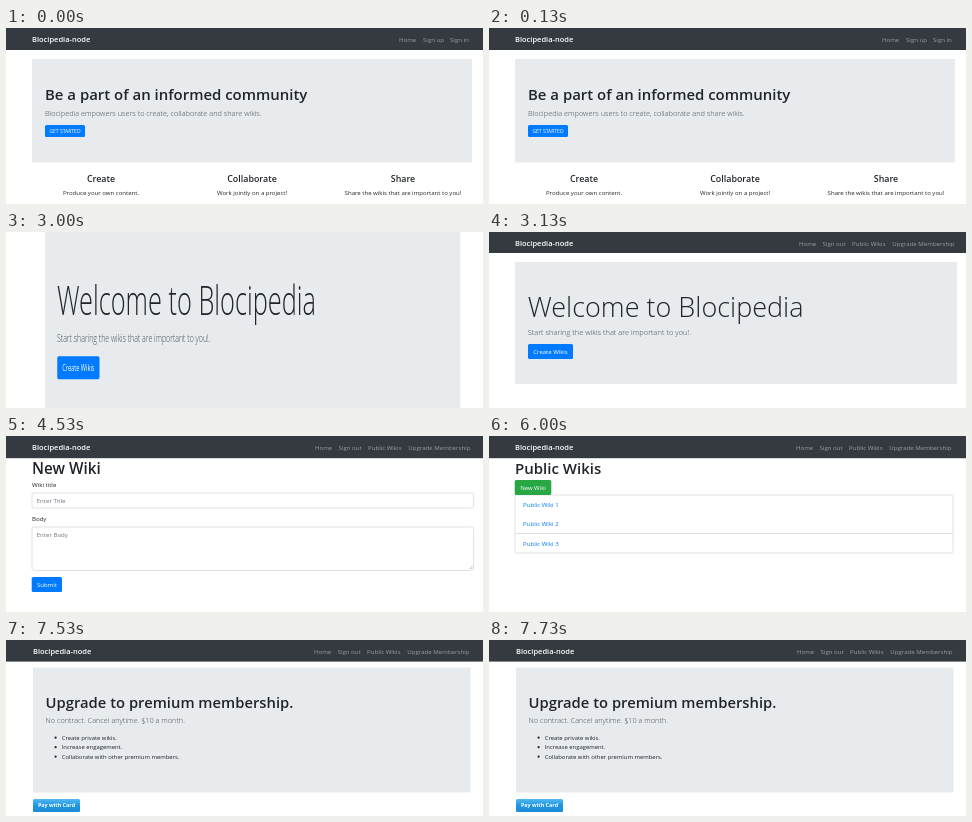
An HTML page for the animation above (8 s loop, 477x176 px).

```html
<!DOCTYPE html>
<html lang="en">
<head>
<meta charset="utf-8">
<title>Wiki tour</title>
<style>
  html, body { margin: 0; width: 100%; height: 100%; overflow: hidden; background: #fff; }
  svg { display: block; width: 100vw; height: 100vh; }
  text { font-family: "Open Sans", "Noto Sans", sans-serif; white-space: pre; }
  .scene { visibility: hidden; }
</style>
</head>
<body>
<svg id="stage" viewBox="0 0 477 176" preserveAspectRatio="none">
  <defs>
    <linearGradient id="pay" x2="0" y2="1">
      <stop offset="0" stop-color="#52b9ee"/>
      <stop offset=".5" stop-color="#1e97e3"/>
      <stop offset="1" stop-color="#1b8ad6"/>
    </linearGradient>
  </defs>
</svg>
<script>
const LOOP = 8000;
const INK = '#212529', MUTED = '#6c757d', BLUE = '#007bff', DARK = '#343a40', PANEL = '#e7ebee';
const stage = document.getElementById('stage');

function add(parent, tag, attrs, content = '') {
  const el = document.createElementNS('http://www.w3.org/2000/svg', tag);
  for (const key in attrs) el.setAttribute(key, attrs[key]);
  el.textContent = content;
  return parent.appendChild(el);
}

const text = (g, x, y, size, str, fill = INK, weight = 400, anchor = 'start') =>
  add(g, 'text', { x, y, fill, 'font-size': size, 'font-weight': weight, 'text-anchor': anchor }, str);

const box = (g, x, y, right, bottom, fill, more = {}) =>
  add(g, 'rect', { x, y, width: right - x, height: bottom - y, fill, ...more });

const outline = (g, x, y, right, bottom) =>
  box(g, x, y, right, bottom, '#fff', { rx: 1.8, stroke: '#d5dade', 'stroke-width': .8 });

const heading = (g, x, y, size, str, anchor) => text(g, x, y, size, str, INK, 600, anchor);
const lead = (g, x, y, size, str) => text(g, x, y, size, str, '#454a4f', 300);

function button(g, x, y, right, bottom, str, size = 6, fill = BLUE, weight = 500) {
  box(g, x, y, right, bottom, fill, { rx: 1.5 });
  text(g, (x + right) / 2, (y + bottom) / 2 + size * .36, size, str, '#fff', weight, 'middle');
}

function navbar(g, brandX, links, height = 22) {
  const baseline = height / 2 + 3;
  box(g, 0, 0, 477, height, DARK);
  text(g, brandX, baseline, 7.5, 'Blocipedia-node', '#fff', 600);
  for (const [x, label] of links) text(g, x, baseline, 6.1, label, '#999da0');
}

const memberLinks = x => [
  [x, 'Home'], [x + 23.5, 'Sign out'], [x + 53, 'Public Wikis'], [x + 93.3, 'Upgrade Membership']
];

function home(g) {
  navbar(g, 26, [[393, 'Home'], [417, 'Sign up'], [444, 'Sign in']]);
  box(g, 26, 31, 466, 134.5, PANEL, { rx: 1 });
  heading(g, 39, 72.3, 14.95, 'Be a part of an informed community');
  lead(g, 39, 87.7, 7.37, 'Blocipedia empowers users to create, collaborate and share wikis.');
  button(g, 39, 97, 79, 109, 'GET STARTED', 5);
  const columns = [
    [95, 'Create', 'Produce your own content.'],
    [246, 'Collaborate', 'Work jointly on a project!'],
    [397, 'Share', 'Share the wikis that are important to you!']
  ];
  for (const [x, title, note] of columns) {
    heading(g, x, 153.8, 8.9, title, 'middle');
    text(g, x, 167, 6.05, note, INK, 400, 'middle');
  }
}

function signIn(g) {
  box(g, 0, 0, 477, 6, DARK);
  text(g, 45, -1, 6.6, 'Blocipedia-node', '#fff', 500);
  heading(g, 45, 19.6, 13.5, 'Sign in');
  const fields = [
    ['Username', 'Enter Username', 'username'],
    ['Email', 'Enter email address', 'address'],
    ['Password', 'Enter password', 'password']
  ];
  fields.forEach(([label, hint, kind], i) => {
    const y = i * 38.3;
    text(g, 45, 31.2 + y, 5.2, label);
    outline(g, 44.8, 36.6 + y, 432, 49.6 + y);
    text(g, 49.7, 45 + y, 5.4, hint, MUTED);
    text(g, 45, 55.4 + y, 4.2, 'must be a valid ' + kind, MUTED);
  });
  button(g, 44.5, 140, 71, 153.5, 'Sign in', 5.3);
}

function welcome(g) {
  navbar(g, 26, memberLinks(310), 21);
  box(g, 26, 30, 468, 152, PANEL, { rx: 1 });
  text(g, 38.7, 85.3, 27, 'Welcome to Blocipedia', INK, 300);
  lead(g, 38.7, 102.5, 7.48, 'Start sharing the wikis that are important to you!.');
  button(g, 39, 112, 84, 127, 'Create Wikis');
}

function newWiki(g) {
  navbar(g, 26, memberLinks(309), 22.2);
  heading(g, 26, 37.6, 15.3, 'New Wiki');
  text(g, 26, 51, 6.1, 'Wiki title');
  outline(g, 26, 57, 467.6, 72);
  text(g, 30.7, 66.7, 6.1, 'Enter Title', MUTED);
  text(g, 26, 85, 6.1, 'Body');
  outline(g, 26, 91, 467.6, 134.3);
  text(g, 30.7, 100.7, 6.1, 'Enter Body', MUTED);
  add(g, 'path', { d: 'M463.5 133l3-3m-1.2 3l1.2-1.2', stroke: '#888', 'stroke-width': .5 });
  button(g, 25.7, 141, 56, 156, 'Submit');
}

function publicWikis(g) {
  navbar(g, 26, memberLinks(307), 22.2);
  heading(g, 26, 37.6, 15, 'Public Wikis');
  outline(g, 26, 59, 464, 117);
  box(g, 26, 97.2, 464, 98, '#d5dade');
  button(g, 25.7, 44, 62.3, 59, 'New Wiki', 6, '#28a745');
  for (let i = 0; i < 3; i++) text(g, 34, 71.2 + i * 19.2, 6.1, 'Public Wiki ' + (i + 1), BLUE);
}

function upgrade(g) {
  navbar(g, 27, memberLinks(308), 21.6);
  box(g, 27, 27.6, 464.5, 152.6, PANEL, { rx: 1 });
  heading(g, 39.5, 68.3, 14.8, 'Upgrade to premium membership.');
  lead(g, 39.5, 83.4, 7.32, 'No contract. Cancel anytime. $10 a month.');
  const perks = ['Create private wikis.', 'Increase engagement.', 'Collaborate with other premium members.'];
  perks.forEach((perk, i) => {
    const y = 99.8 + i * 9.5;
    add(g, 'circle', { cx: 49.6, cy: y - 2.1, r: 1.1, fill: INK });
    text(g, 55.7, y, 5.9, perk);
  });
  button(g, 27, 159, 74, 172, 'Pay with Card', 5.4, 'url(#pay)', 700);
}

// Keyframes that hold each value until the next listed time.
function hold(el, property, steps) {
  const frames = steps.map(([ms, value]) =>
    ({ offset: ms / LOOP, [property]: value, easing: 'step-end' }));
  frames.push({ offset: 1, [property]: steps[steps.length - 1][1] });
  el.animate(frames, { duration: LOOP, iterations: Infinity });
}

const scenes = [
  [0, home], [1530, signIn], [3000, welcome], [4530, newWiki], [6000, publicWikis], [7530, upgrade]
];

scenes.forEach(([start, draw], i) => {
  const g = add(stage, 'g', { class: 'scene' });
  draw(g);
  const steps = [[start, 'visible']];
  if (start) steps.unshift([0, 'hidden']);
  if (scenes[i + 1]) steps.push([scenes[i + 1][0], 'hidden']);
  hold(g, 'visibility', steps);
  if (draw === welcome) hold(g, 'transform', [
    [0, 'matrix(.9395, 0, 0, 1.53, 14.6, -47)'],
    [3070, 'matrix(.97, 0, 0, 1.265, 7.3, -23.5)'],
    [3130, 'matrix(1, 0, 0, 1, 0, 0)']
  ]);
});
</script>
</body>
</html>
```
